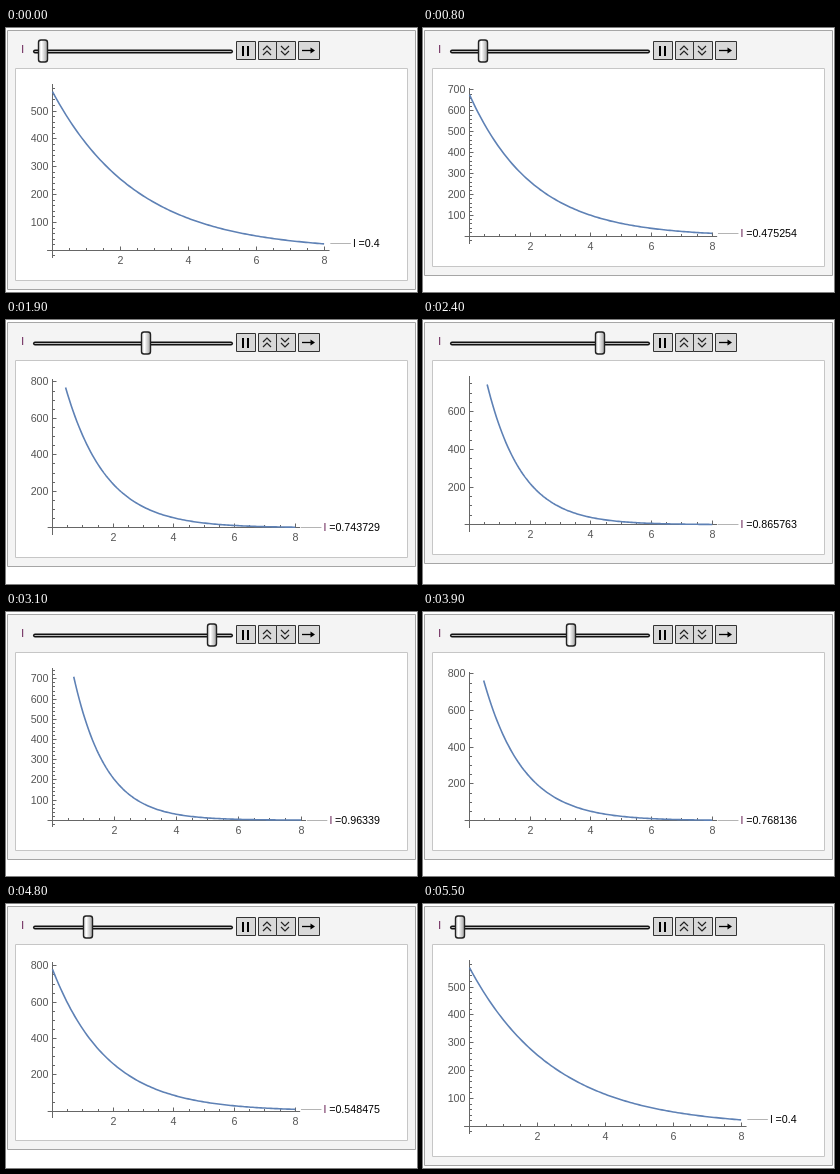
An HTML page with a canvas that plays this animation: 411x264 px, repeating every 6 s.

```html
<!DOCTYPE html>
<html lang="en">
<head>
<meta charset="utf-8">
<title>Exponential decay</title>
<style>
  html, body { margin: 0; width: 100%; height: 100%; overflow: hidden; background: #fff; }
  canvas { display: block; width: 411px; height: 264px; }
</style>
</head>
<body>
<canvas id="stage" width="411" height="264"></canvas>
<script>
const g = document.getElementById('stage').getContext('2d');
const LOOP = 6000, STEP = 100, START = 500;
const AREA = 1425, X0 = 46.5, GOLDEN = 1.618;
const BLUE = '#5e81b5', PLUM = '#5c0f48', AXIS = '#666', INK = '#555';
const FONT = '10.7px "Liberation Sans", Arial, sans-serif';

// Slider position 0..59: there and back in steps of 2.4
function position(t) {
  if (t < START) return 0;
  const p = 0.2 + 2.4 * (Math.floor(t / STEP) - START / STEP);
  return Math.max(0, p > 59 ? 118 - p : p);
}

function line(color, width, ...pts) {
  g.strokeStyle = color;
  g.lineWidth = width;
  g.beginPath();
  for (let i = 0; i < pts.length; i += 2) g.lineTo(pts[i], pts[i + 1]);
  g.stroke();
}

function box(x, y, w, h, fill, stroke, radius = 0, width = 1) {
  g.beginPath();
  g.roundRect(x, y, w, h, radius);
  g.fillStyle = fill;
  g.fill();
  g.strokeStyle = stroke;
  g.lineWidth = width;
  g.stroke();
}

function text(str, x, y, color, align = 'left') {
  g.font = FONT;
  g.fillStyle = color;
  g.textAlign = align;
  g.fillText(str, x, y);
}

function drawSlider(u) {
  text('l', 15.5, 25, PLUM);
  g.lineCap = 'round';
  line('#111', 4, 29, 23.5, 225, 23.5);
  line('#bbb', 1.2, 29, 23.5, 225, 23.5);
  g.lineCap = 'butt';
  const x = Math.round(37 + u * 3.055);
  const shade = g.createLinearGradient(x - 5, 0, x + 5, 0);
  shade.addColorStop(0, '#ccc');
  shade.addColorStop(0.35, '#fff');
  shade.addColorStop(1, '#999');
  box(x - 4.5, 12, 9, 22, shade, '#222', 2.5, 1.4);
}

function drawButtons() {
  for (const [x, w] of [[230.5, 19], [252.5, 18], [270.5, 19], [292.5, 21]])
    box(x, 13.5, w, 18, '#d8d8d8', '#333');
  g.fillStyle = '#000';
  g.fillRect(236, 18, 2, 10);
  g.fillRect(241, 18, 2, 10);
  for (const y of [22, 27]) {
    line('#222', 1.2, 257, y, 261, y - 4, 265, y);
    line('#222', 1.2, 275, y - 4, 279, y, 283, y - 4);
  }
  line('#000', 1.3, 296, 22.5, 307, 22.5);
  g.fillStyle = '#000';
  g.beginPath();
  g.moveTo(309, 22.5);
  g.lineTo(304.5, 19.5);
  g.lineTo(304.5, 25.5);
  g.fill();
}

// Plot scale and placement for a given rate
function layout(rate, label) {
  const sx = 30.35 + 0.72 * (8 - label.length);
  const height = sx * 8 * 1.04 / GOLDEN;
  const clipped = rate > 0.68;
  const max = clipped
    ? 754.5 - (rate < 0.866 ? 195 : 359) * (rate - 0.866)
    : AREA * rate;
  const sy = height / 1.1 / max;
  const major = max > 740 ? 200 : 100;
  const minor = major === 200 ? 50 : 20;
  // The top tick label may stick out above the axis and push the plot down
  const topTick = Math.floor(max * 1.05 / major) * major;
  const rise = Math.max(0, (topTick - max * 1.05) * sy + 6.2);
  const top = 55.7 + rise, bottom = top + height;
  return { sx, sy, max, clipped, major, minor, top, bottom,
           zero: bottom - height * 0.05 / 1.1,
           frame: Math.ceil(bottom + 31.7) };
}

function drawAxes(p) {
  const base = Math.floor(p.zero) + 0.5;
  line(AXIS, 1, X0, Math.round(p.top), X0, Math.round(p.bottom));
  line(AXIS, 1, X0 - 0.16 * p.sx, base, X0 + 8.16 * p.sx, base);
  for (let v = 0; v <= 8; v += 0.5) {
    const x = Math.floor(X0 + v * p.sx) + 0.5, big = v % 2 === 0;
    line(AXIS, 1, x, base, x, base - (big ? 4 : 2.5));
    if (big && v) text(v, x, Math.round(p.zero + 13.5), INK, 'center');
  }
  const low = Math.ceil(-p.max * 0.05 / p.minor) * p.minor;
  for (let v = low; v <= p.max * 1.05; v += p.minor) {
    const y = Math.floor(p.zero - v * p.sy) + 0.5, big = v % p.major === 0;
    line(AXIS, 1, X0, y, X0 + (big ? 4 : 2.5), y);
    if (big && v > 0) text(v, 42.5, Math.round(y + 3.3), INK, 'right');
  }
}

function drawCurve(p, rate) {
  const peak = AREA * rate;
  const from = p.clipped ? Math.log(peak / (0.988 * p.max)) / rate : 0;
  const yAt = x => p.zero - peak * Math.exp(-rate * x) * p.sy;
  const pts = [];
  for (let i = 0; i <= 120; i++) {
    const x = from + (8 - from) * i / 120;
    pts.push(X0 + x * p.sx, yAt(x));
  }
  g.lineJoin = 'round';
  line(BLUE, 1.6, ...pts);
  g.lineJoin = 'miter';
  return yAt(8);
}

function draw(t) {
  const u = position(t), rate = 0.4 + 0.6 * u / 59;
  const label = String(Number(rate.toPrecision(6)));
  const p = layout(rate, label);
  g.fillStyle = '#fff';
  g.fillRect(0, 0, 411, 264);
  box(1.5, 2.5, 408, p.frame - 3, '#f4f4f4', '#a6a6a6');
  box(9.5, 40.5, 392, p.frame - 50, '#fff', '#c6c6c6');
  drawSlider(u);
  drawButtons();
  drawAxes(p);
  const end = drawCurve(p, rate);
  const x = X0 + 8.16 * p.sx + 0.8, y = Math.floor(end) + 0.5;
  line('#b4b4b4', 1, x, y, x + 20.5, y);
  text('l', x + 22.8, Math.round(y + 3.2), u ? PLUM : '#000');
  text('=' + label, x + 28.2, Math.round(y + 3.2), '#000');
}

function tick() {
  draw(performance.now() % LOOP);
  requestAnimationFrame(tick);
}
tick();
</script>
</body>
</html>
```
